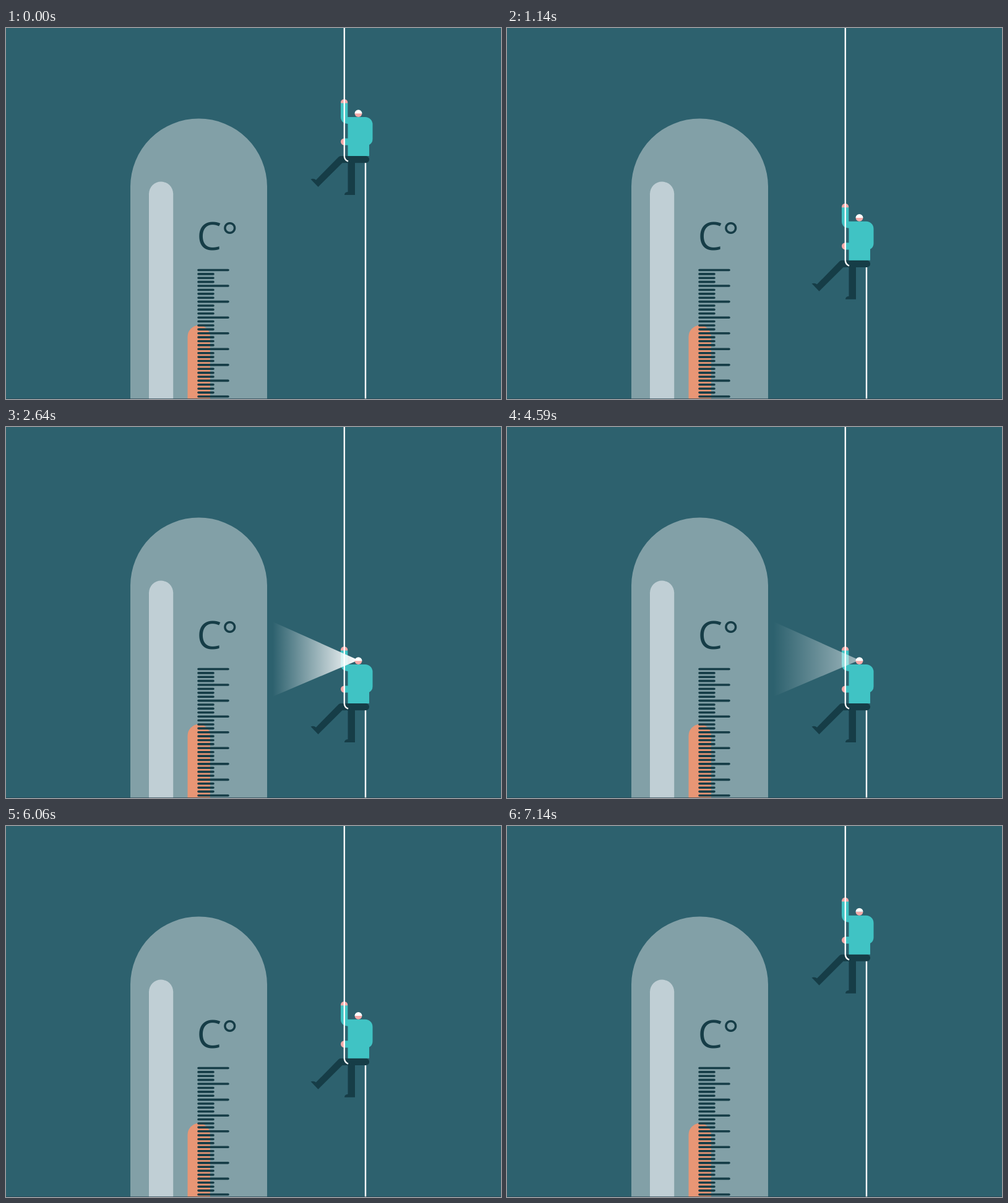
Recreate the animation shown at these times as an HTML page. Size 800 by 600 pixels, loop 7170 ms.

```html
<!DOCTYPE html>
<html lang="en">
<head>
<meta charset="utf-8">
<title>Thermometer climber</title>
<style>
  html, body { margin: 0; width: 100%; height: 100%; overflow: hidden; background: #2d616e; }
  svg { display: block; width: 100%; height: 100%; }
  text { font: 63px "Open Sans", "Noto Sans", sans-serif; }
</style>
</head>
<body>
<svg viewBox="0 0 800 600">
  <defs>
    <linearGradient id="light" gradientUnits="userSpaceOnUse" x1="431" y1="0" x2="569" y2="0">
      <stop offset="0" stop-color="#fff" stop-opacity="0"/>
      <stop offset="1" stop-color="#fff"/>
    </linearGradient>
  </defs>
  <rect width="800" height="600" fill="#2d616e"/>

  <path d="M201 600V257a110.5 110.5 0 0 1 221 0V600z" fill="#82a0a7"/>
  <path d="M231 600V268.2a19.6 19.6 0 0 1 39.2 0V600z" fill="#c0cfd5"/>
  <path d="M293.5 600V499a18.2 18.2 0 0 1 36.4 0V600z" fill="#e89675"/>
  <text x="308.5" y="359" fill="#163d47">C°</text>
  <path id="ticks" stroke="#163d47" stroke-width="3.6" stroke-linecap="round"/>

  <g id="man">
    <path d="M581 217V620" stroke="#fff" stroke-width="2.4"/>
    <g fill="#163d47">
      <path d="M541 207H581.5a5.6 5.6 0 0 1 0 11.2H543.5L509 252.5L504.5 257L492.5 244.5Q497.5 242.8 501 245.7L537.5 208.5Q539 207 541 207z"/>
      <path d="M552.5 217H564V270H547Q547 265.5 552.5 265z"/>
    </g>
    <g fill="#f5a9a8">
      <circle cx="546.6" cy="120.5" r="5.6"/>
      <circle cx="546.6" cy="184" r="5.6"/>
    </g>
    <path fill="#40c3c4" d="M541 121.5H552.3V144H580.5a12 12 0 0 1 12 12V179.5Q592.5 186 587 189V207H552.5V189.6H546.8V178.4H552.5V155Q541 154 541 143.5z"/>
    <path d="M546.8 -260V207Q547 213.5 553 215.7" fill="none" stroke="#fff" stroke-width="2.4"/>
    <path id="beam" d="M569.5 137L431 75V196z" fill="url(#light)"/>
    <path d="M563.5 138a6 6 0 0 0 12 0z" fill="#f5a9a8"/>
    <path d="M563.5 138.2a6 6 0 0 1 12 0z" fill="#fff"/>
  </g>
  <rect y="599" width="800" height="1" fill="#26404f" opacity=".7"/>
</svg>
<script>
  const LOOP = 7170, STEP = 30, TURN = 3600;
  const DROP = 240, DROP_TIME = 1800;
  const man = document.getElementById("man");
  const beam = document.getElementById("beam");

  let marks = "";
  for (let i = 0; i < 33; i++) {
    marks += `M311 ${(391.5 + i * 6.39).toFixed(2)}H${i % 4 ? 335 : 359}`;
  }
  document.getElementById("ticks").setAttribute("d", marks);

  const part = (t, from, to) => Math.min(1, Math.max(0, (t - from) / (to - from)));

  // A weak flash on arrival, then the lamp comes on fully.
  function lamp(t) {
    const flash = 0.55 * Math.sin(Math.PI * part(t, 1800, 2100));
    return t < 2400 ? flash : part(t, 2550, 2640) ** 1.5;
  }

  function draw(time) {
    const step = Math.floor((time % LOOP) / STEP + 0.001) * STEP;
    const t = step > TURN ? 2 * TURN - step : step;
    const y = DROP * (1 - Math.cos(Math.PI * part(t, 0, DROP_TIME))) / 2;
    man.setAttribute("transform", `translate(0 ${y.toFixed(2)})`);
    beam.setAttribute("opacity", lamp(t).toFixed(3));
  }

  const start = performance.now();
  function tick() {
    draw(performance.now() - start);
    requestAnimationFrame(tick);
  }
  tick();
</script>
</body>
</html>
```
